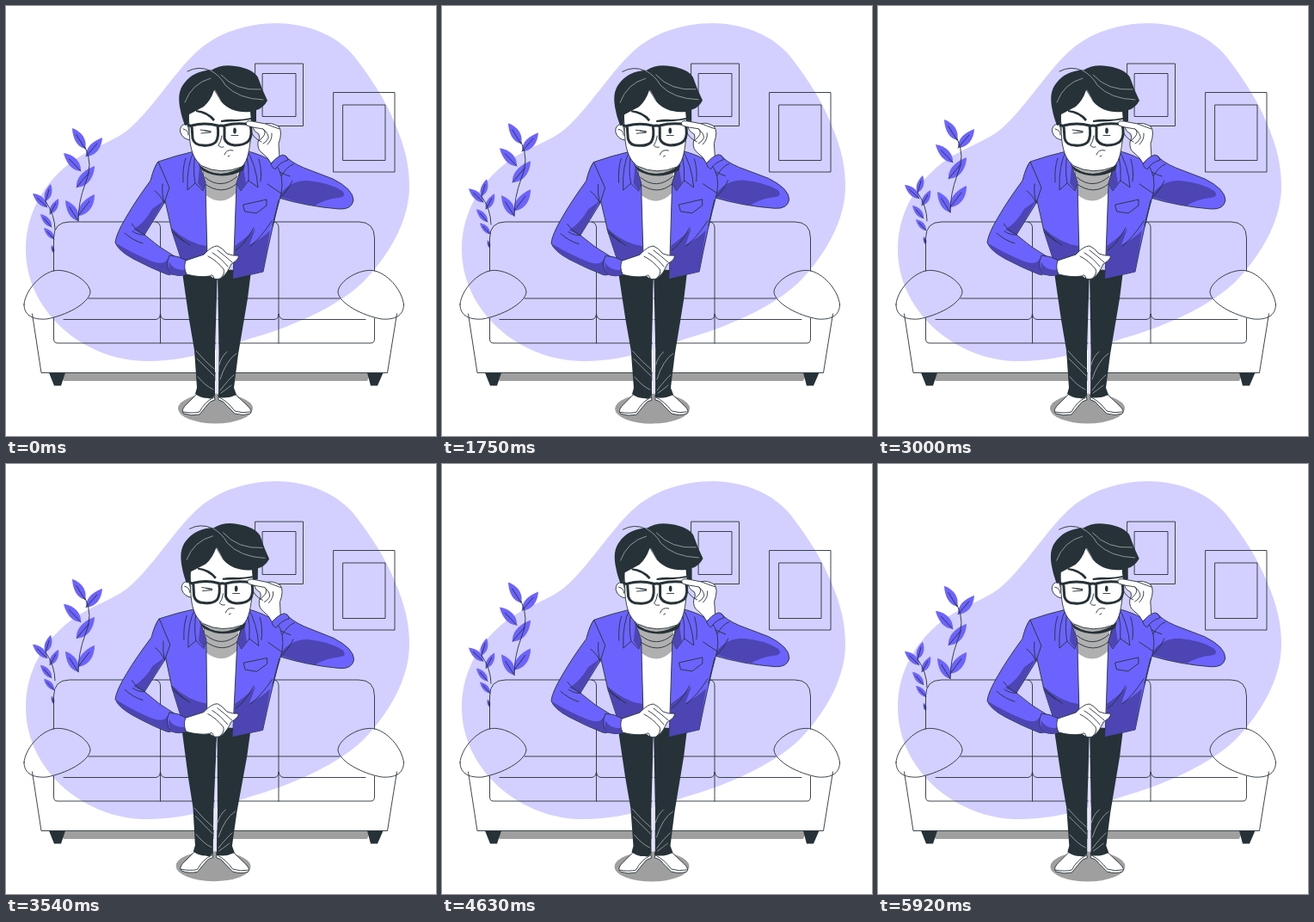
These frames come from a looping animation (500 px wide and 500 px high, 5960 ms). An HTML page:

```html
<!DOCTYPE html>
<html lang="en">
<head>
<meta charset="utf-8">
<title>Man adjusting his glasses</title>
<style>
  html, body { margin: 0; width: 100%; height: 100%; overflow: hidden; background: #fff; }
  svg { display: block; width: 100vw; height: 100vh; }
  .line { fill: none; stroke: #263238; stroke-width: .9; stroke-linecap: round; stroke-linejoin: round; }
  .ink { fill: #263238; }
  .white { fill: #fff; stroke: #263238; stroke-width: .9; stroke-linejoin: round; }
  .coat { fill: #6c63ff; stroke: #263238; stroke-width: .9; stroke-linejoin: round; }
  .shade { fill: #4c45b3; }
  .grey { fill: #9f9f9f; }
  .crease { fill: none; stroke: #a9adb0; stroke-width: .8; stroke-linecap: round; }
  .rim { fill: none; stroke: #263238; stroke-width: 3; stroke-linejoin: round; }
</style>
</head>
<body>
<svg viewBox="0 0 500 500">
  <path fill="#d3d0ff" d="M315 20C352 20 388 36 406 60C425 85 440 107 452 136C464 164 469 185 469 210C469 246 449 285 419 317C396 342 350 366 300 382C260 393 220 413 165 413C90 413 23 355 23 283C23 240 45 205 75 182C100 164 125 158 143 143C170 120 195 78 222 53C245 32 278 20 315 20Z"/>

  <path class="line" d="M290 67h55.500v72.500h-55.500zM298.500 78.500h38.500v50h-38.500zM381 100.500h71v92.500h-71zM392 115h49v64.500h-49z"/>

  <g id="plant"></g>

  <!-- sofa -->
  <path class="grey" d="M62 427H424L420 436H67Z"/>
  <path class="ink" d="M50 426.500H69L64 441.500H56ZM420 426.500H438.500L432 441.500H424Z"/>
  <path class="line" d="M55.500 308V270Q55.500 251 74 251H410Q428.500 251 428.500 270V308M55.500 363V387Q55.500 392 60 392H424Q428.500 392 428.500 387V363
    M174 251Q179.500 252 179.500 258V392M312 251Q317 252 317 258V392
    M96 340H388M67 364.500H174Q179 364 179.500 358Q180 364 185 364.500H312Q317 364 317 358Q318 364 323 364.500H418
    M30.500 358L41 426.500H443.500L454.500 358"/>
  <path class="line" d="M21 347C22 333 37 313 55 308C72 304 98 320 98 333C96 346 70 360 47 364C33 365 21 361 21 347ZM462.500 347C461 333 447 313 429 308C412 304 386 320 386 333C388 346 414 360 437 364C451 365 462.500 361 462.500 347Z"/>

  <g id="man">
    <ellipse class="grey" cx="243.500" cy="468" rx="43.500" ry="17.500"/>
    <path class="white" d="M222 451L208 465Q203 471 207 474Q215 477 225 475L234 464Q237 459 243 458L242 452Z"/>
    <path class="white" d="M247 452L247 458Q253 459 256 464L266 474Q276 477 284 474Q287 471 281 465L266 451Z"/>
    <path class="line" d="M206 472Q217 474 225 472Q231 460 242 455M248 455Q258 460 266 471Q275 474 284 472"/>

    <!-- trousers -->
    <path class="ink" d="M205 310L246 306L243 400L243 452Q240 458 235 456Q226 456 220 451L222 444L219 400L213 365Z"/>
    <path class="ink" d="M246 306L285 308L281 340L270 405L265 444L268 452Q258 457 247 455L247.500 400Z"/>
    <path d="M245.300 316L244.300 400L243.500 450L247 450L247 400Z" fill="#e4e2ff"/>
    <path class="crease" d="M221 401Q232 414 242 422M222 410Q232 420 242 430M223 431Q232 442 241 446M268 404Q256 412 249 434M257 402Q250 408 248 417M265 429Q258 435 249 447M262 441Q256 446 250 450"/>

    <!-- shirt and neck -->
    <path class="white" d="M229 184L272 184L266 295L234 295Z"/>
    <path fill="#b0b0b0" d="M229 184H270L268 217Q251 235 231 219Z"/>
    <path class="line" d="M231 199Q250 215 269 198M230 206Q251 222 269 206"/>

    <!-- far arm -->
    <path class="coat" d="M307 183L325 174Q330 181 346 188L380 201Q404 213 404 226Q402 237 387 236Q350 233 317 223Z"/>
    <path class="shade" d="M319 219Q330 203 350 203Q375 205 391 215Q397 222 386 223Q371 225 359 232Q340 229 319 222Z"/>
    <path class="line" d="M311 188Q318 194 330 198M334 184Q327 186 320 198M318 224Q329 213 333 203"/>

    <!-- jacket fronts -->
    <path class="coat" d="M219 169Q197 174 177 181Q172 188 170 201L184 222L193 262L204 296L234 292L232 207Z"/>
    <path class="coat" d="M278 168Q299 173 313 183Q324 197 320 218Q309 258 299 309L264 317L268 207Z"/>
    <path class="shade" d="M192 258Q212 276 233 279V292L204 296ZM266 279Q281 268 290 259L283 278Q298 270 307 261L299 309L264 317Z"/>
    <path class="line" d="M192 259Q201 270 214 278M288 258Q276 279 267 284M309 250Q296 270 284 279M320 218L304 207M317 226L310 255"/>
    <path class="line" d="M276 231L303 225L303 232L291 241L278 239Z"/>
    <path class="coat" d="M219 168Q210 184 211 214L220 206L229 215L232 205L226 188Z"/>
    <path class="coat" d="M279 166Q291 184 293 211L282 203L273 215L268 206L275 187Z"/>
    <path class="shade" d="M225 187L232 205L229 214L223 206ZM276 187L268 206L273 214L279 206Z"/>
    <path class="line" d="M220 206Q217 190 220 172M282 203Q283 188 280 174M209 177Q205 188 206 205M294 178Q298 192 296 204"/>

    <!-- near arm -->
    <path class="coat" d="M177 181Q172 187 168 203Q151 226 140 245Q128 265 127 275Q130 284 148 294Q169 305 187 312Q196 315 195 303L196 291Q178 281 161 266L184 229L190 211Z"/>
    <path class="shade" d="M128 276Q150 289 170 297Q184 302 188 294L193 291L194 307Q192 315 183 310L146 293Q132 286 128 276ZM184 226L161 266L148 260Q162 251 170 236Z"/>
    <path class="line" d="M184 229Q179 219 173 215M184 229Q181 219 182 207M161 266Q152 262 146 253M161 266Q155 267 147 262M159 276Q148 273 138 264M193 263L207 274"/>
    <path class="coat" d="M190 290Q200 290 210 296Q207 304 210 312Q202 315 193 312Q184 304 190 290Z"/>
    <path class="shade" d="M190 298Q194 307 208 307L210 312Q202 315 193 312Q188 306 190 298Z"/>
    <path class="white" d="M209 296L230 289Q239 279 246 279Q251 281 257 288Q264 291 270 290Q272 294 262 300Q258 310 251 316Q244 320 237 314Q225 316 210 312Q206 304 209 296Z"/>
    <path class="line" d="M235 291Q245 296 253 306Q255 311 250 316M240 287Q250 293 258 303M246 284Q255 291 263 298M237 314Q241 310 242 318"/>

    <!-- head -->
    <path class="white" d="M211 137Q202 137 202.500 146Q205 155 215 156Z"/>
    <path class="line" d="M206 143Q212 144 212 150"/>
    <path class="ink" d="M224 184Q248 206 278 184L276 191Q251 204 228 191Z"/>
    <path class="white" d="M211 112L213 140C213 164 217 178 228 186Q250 197 274 187C282 180 283 165 285 150L288 106L246 84Z"/>
    <path class="ink" d="M208 139Q204 128 203 122Q198 101 207 90Q218 75 239 74.500Q251 67 267 70Q287 73 293 83Q298 98 304 110Q299 119 291 121L291 134L285 134L284 123Q262 125 250 111L242 98Q238 110 230 117L213 126L212 138Z"/>
    <path class="line" d="M211 76Q224 69 237 75"/>
    <path class="crease" d="M238 75Q249 81 255 92Q270 108 299 109M250 80Q267 99 296 97M243 98Q247 105 250 111M238 84Q216 90 208 112"/>

    <!-- face -->
    <path class="ink" d="M221 121Q235 122 243 132L241 134Q234 125 221 123ZM250 133Q260 131 267 132Q277 132 285 130V132Q268 135 250 135Z"/>
    <path class="line" d="M226 144L238 145.500M227 148L238 147M231 145L238 146.500M262 150.500H270M251 151Q250 158 247 162Q249 165 253 164M254 173Q256 166 264 168M258 175L260 174"/>
    <ellipse class="ink" cx="266" cy="145" rx="1.800" ry="3.500"/>
    <path class="rim" d="M216 139Q231 135 246 139Q248 152 244 158Q239 163 229 162Q219 162 217 154ZM254 139Q269 135 284 138Q287 151 282 157Q277 162 266 162Q256 161 254 154ZM246 140Q250 138 254 140M216 140L211 138M284 139L290 137"/>

    <!-- raised hand -->
    <path class="white" d="M279 136Q280 133 286 134L302 137Q308 135 317 140Q322 146 317 160L318 176L308 183Q305 176 298 171Q292 167 293 158Q296 153 294 149Q288 146 287 141L280 139Z"/>
    <path class="line" d="M287 141L299 143Q303 147 299 152L294 157M302 137Q309 140 318 143M299 143Q306 149 305 154Q302 159 299 160M309 148Q310 155 304 161M285 146Q288 154 297 158"/>
    <path class="coat" d="M308 184Q313 176 322 173Q327 174 328 179Q318 182 313 190Q309 188 308 184Z"/>
  </g>
</svg>
<script>
  // each leaf: base x, base y, tip x, tip y
  const leaves = [
    [92, 166, 77, 142], [93, 175, 112, 153], [87, 192, 67, 171],
    [82, 211, 103, 186], [84, 250, 69, 226], [84, 244, 103, 219],
    [48, 234, 31, 218], [46, 227, 52, 207], [51, 242, 61, 224],
    [53, 257, 40, 242], [56, 271, 44, 258], [55.500, 287, 53, 278]
  ];

  function leaf([x, y, tx, ty]) {
    const dx = tx - x, dy = ty - y;
    const side = (at, w) => `${x + dx * at - dy * w} ${y + dy * at + dx * w}`;
    return `<path fill="#6c63ff" d="M${x} ${y}C${side(.25, .27)} ${side(.65, .27)} ${tx} ${ty}
      C${side(.65, -.2)} ${side(.25, -.25)} ${x} ${y}Z"/>
      <path class="line" d="M${x} ${y}L${x + dx * .68} ${y + dy * .68}"/>`;
  }

  const plant = document.getElementById('plant');
  const man = document.getElementById('man');
  plant.innerHTML = leaves.map(leaf).join('') +
    '<path class="line" d="M84 250Q84 228 92 207Q102 184 92 164M46 227Q57 243 57 260"/>';

  const LOOP = 5960, FPS = 24;

  function draw(now) {
    const t = Math.floor((now % LOOP + 5) * FPS / 1000) / FPS;
    const sway = t / 3 % 1;
    const angle = sway < .25 ? sway * 4 : sway < .75 ? 2 - sway * 4 : sway * 4 - 4;
    const lift = 10 * (1 - Math.abs(t / 3 - 1));
    man.setAttribute('transform', `rotate(${angle} 265.500 277)`);
    plant.setAttribute('transform', `translate(0 ${-lift})`);
  }

  const start = performance.now();
  function tick() {
    draw(performance.now() - start);
    requestAnimationFrame(tick);
  }
  tick();
</script>
</body>
</html>
```
